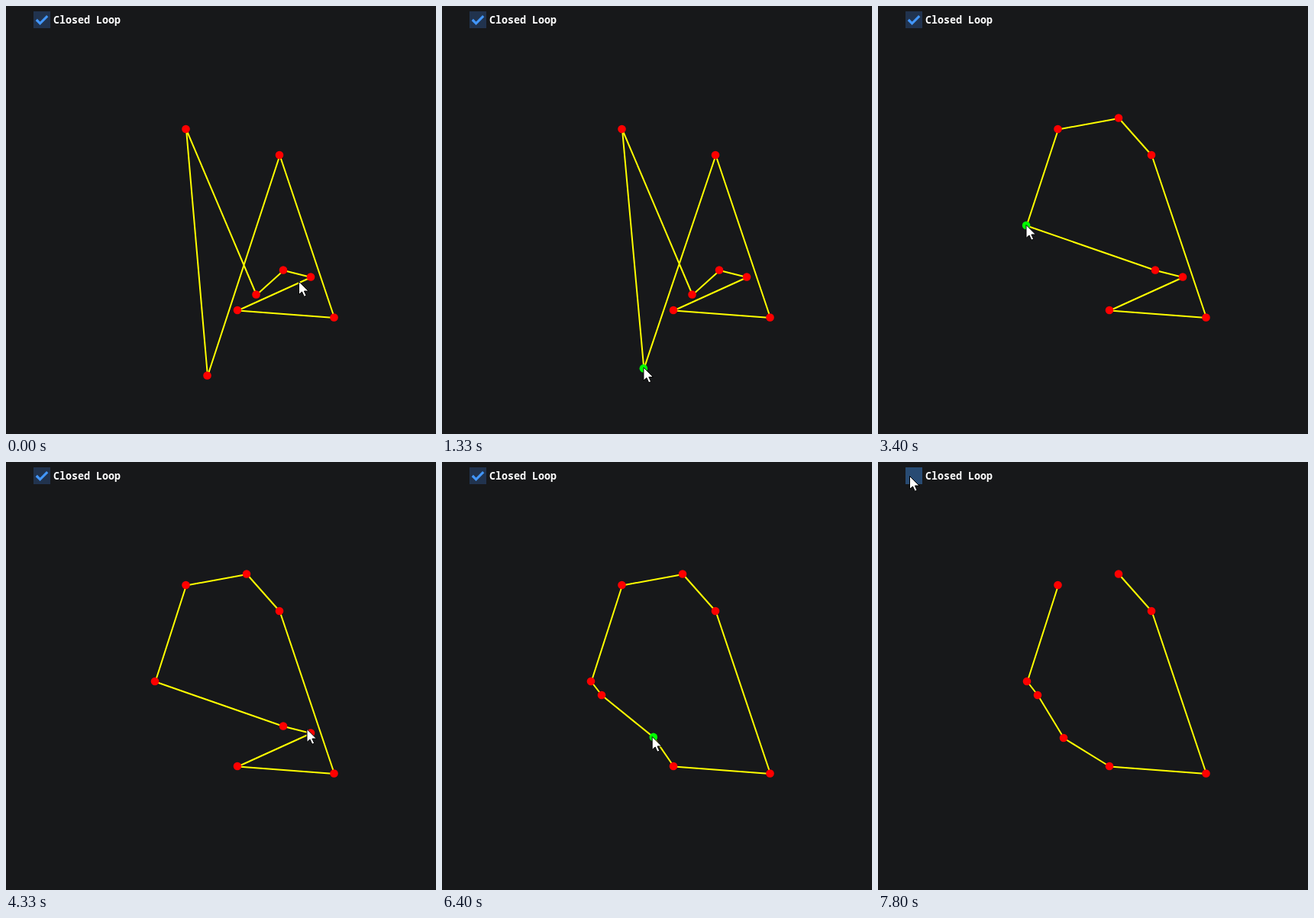
These frames come from a looping animation (563x560 px, 8000 ms). An HTML page:

```html
<!DOCTYPE html>
<html lang="en">
<head>
<meta charset="utf-8">
<title>Closed Loop</title>
<style>
  html, body { margin: 0; width: 100%; height: 100%; overflow: hidden; background: #17181a; }
  svg { display: block; width: 100%; height: 100%; }
  text { font: 600 13.333px "Noto Sans Mono", "DejaVu Sans Mono", monospace; fill: #fff; }
  #check { fill: none; stroke: #4296fa; stroke-width: 3.2; }
  #outline { fill: none; stroke: #ff0; stroke-width: 2; stroke-linejoin: round; }
  #cursor { fill: #fff; stroke: #000; stroke-width: 1; }
</style>
</head>
<body>
<svg viewBox="0 0 563 560">
  <rect id="box" x="36" y="7" width="22" height="22"/>
  <path id="check" d="M39.8 18L44.6 22.8L54.2 13.2"/>
  <text x="62" y="23">Closed Loop</text>
  <path id="outline"/>
  <g id="dots"></g>
  <path id="cursor" d="M-.5 -.5V16.5L3.5 13L6.3 19.3L9.2 18L6.4 12H12Z"/>
</svg>
<script>
const FPS = 15, LOOP = 8000;
const $ = id => document.getElementById(id);

const smooth = u => u * u * (3 - 2 * u);
const linear = u => u;
const rush = u => u ** 3.2;

// All times below are in ticks of 1/15 s: begin, end, x, y, easing.
const home = [384, 361];
const moves = [
  [0, 13, 264, 482, smooth],
  [13, 14, 263, 484, linear],
  [17, 26, 312, 131, rush],
  [27, 29, 315, 147, linear],
  [29, 33, 356.5, 361, smooth],
  [33, 36, 323, 379, smooth],
  [47, 51, 194.5, 287, smooth],
  [54, 63, 427, 350, smooth],
  [63, 67, 362, 350, smooth],
  [68, 74, 207, 305, smooth],
  [75, 77, 223, 316, linear],
  [77, 79, 345, 345, linear],
  [81, 89, 395, 357, smooth],
  [90, 91, 398, 356, linear],
  [91, 98.1, 243, 361, smooth],
  [100, 110, 23, 36, smooth],
  [110, 114, 42, 19, smooth]
];

const points = [
  { from: [263.5, 483.5], to: [315, 146.5], grab: 17, move: 18, drop: 29 },
  { from: [358, 195] },
  { from: [429.5, 407.5] },
  { from: [303, 398] },
  { from: [399, 354.5], to: [243, 361], grab: 91, move: 92, drop: 101 },
  { from: [363, 345.5], to: [209, 305], grab: 69, move: 69, drop: 76 },
  { from: [327.5, 377.5], to: [195, 287], grab: 44, move: 48, drop: 55 },
  { from: [235.5, 161] }
];
const PRESS = 114, TOGGLE = 116, DRAG_LAG = 0.06;

for (const p of points) {
  p.dot = document.createElementNS("http://www.w3.org/2000/svg", "circle");
  p.dot.setAttribute("r", 5.3);
  $("dots").append(p.dot);
}

function cursorAt(tick) {
  let [x, y] = home;
  for (const [begin, end, toX, toY, ease] of moves) {
    if (tick <= begin) break;
    const u = ease(Math.min(1, (tick - begin) / (end - begin)));
    x += (toX - x) * u;
    y += (toY - y) * u;
  }
  return [x, y];
}

function pointAt(p, tick) {
  if (!p.to || tick < p.move) return p.from;
  if (tick >= p.drop) return p.to;
  const [x, y] = cursorAt(tick - DRAG_LAG);
  return [x - 0.5, y];
}

function boxColor(tick, [x, y]) {
  const hovered = x >= 36 && x < 58 && y >= 7 && y < 29;
  if (!hovered) return "#21334e";
  return tick >= PRESS && tick < TOGGLE ? "#346cb0" : "#284b73";
}

function draw(tick) {
  const closed = tick < TOGGLE;
  const cursor = cursorAt(tick);
  const places = points.map(p => pointAt(p, tick));

  points.forEach((p, i) => {
    p.dot.setAttribute("cx", places[i][0]);
    p.dot.setAttribute("cy", places[i][1]);
    p.dot.setAttribute("fill", tick >= p.grab && tick < p.drop ? "#0f0" : "#f00");
  });
  const corners = places.map(([x, y]) => `${x + 0.5} ${y + 0.5}`);
  $("outline").setAttribute("d", `M${corners.join("L")}${closed ? "Z" : ""}`);
  $("check").style.display = closed ? "" : "none";
  $("box").setAttribute("fill", boxColor(tick, cursor));
  $("cursor").setAttribute("transform", `translate(${cursor})`);
}

const start = performance.now();
function frame() {
  const ms = (performance.now() - start) % LOOP;
  draw(Math.min(LOOP * FPS / 1000 - 1, Math.floor((ms + 3.5) * FPS / 1000)));
  requestAnimationFrame(frame);
}
frame();
</script>
</body>
</html>
```
